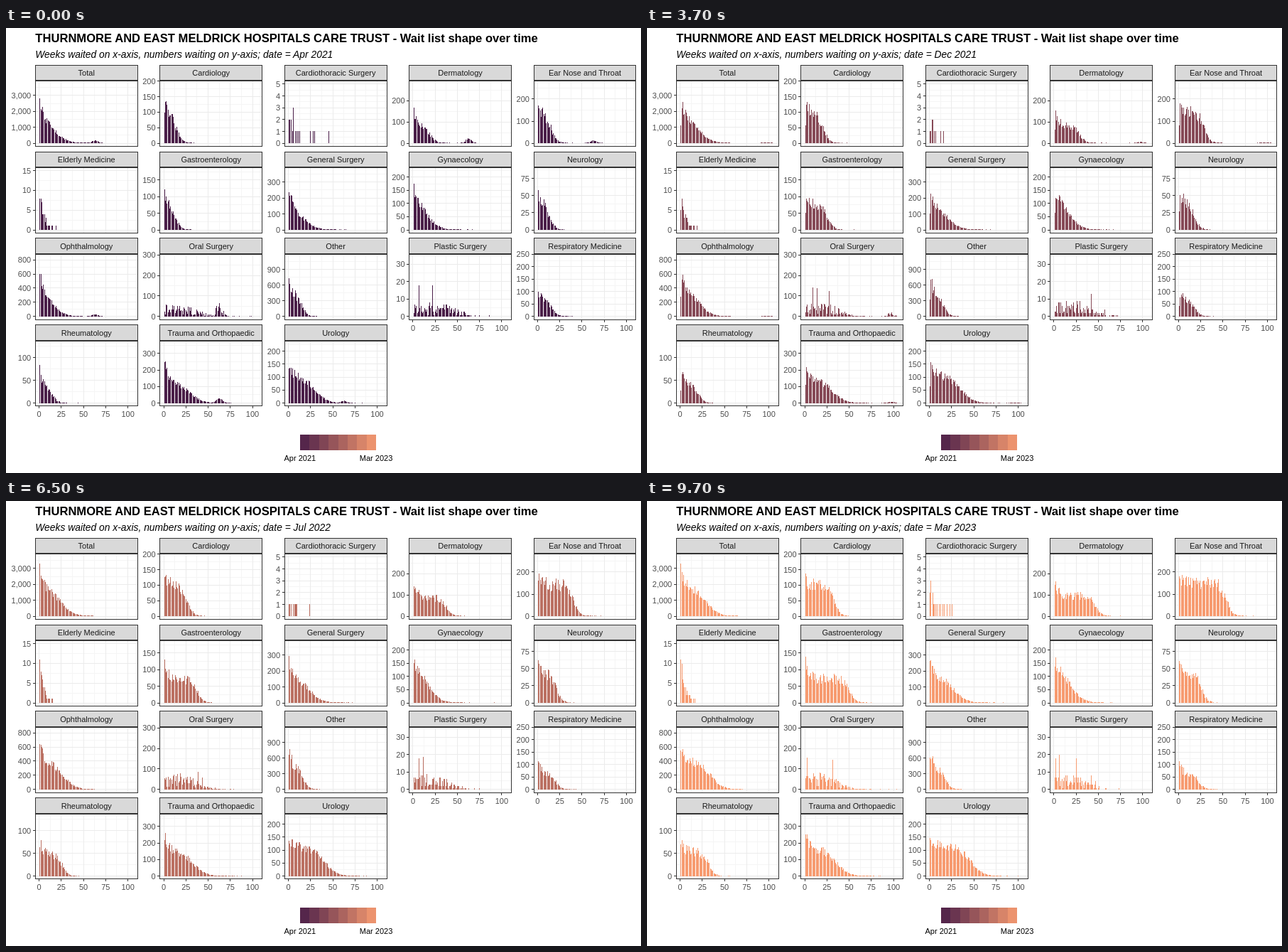
An HTML page that plays this animation: 894x626 px, repeating every 10000 ms.

```html
<!DOCTYPE html>
<html lang="en">
<head>
<meta charset="utf-8">
<title>Wait list shape over time</title>
<style>
html, body { margin: 0; width: 100%; height: 100%; overflow: hidden; background: #fff; }
svg { display: block; font: 11.04px "Liberation Sans", Arial, sans-serif; }
.title { font-size: 16.6px; font-weight: bold; }
.sub { font-size: 13.85px; font-style: italic; }
.axis { fill: #4d4d4d; }
.mid { text-anchor: middle; }
.end { text-anchor: end; }
.strip { fill: #1a1a1a; }
path, rect { shape-rendering: crispEdges; }
.grid { stroke: #ebebeb; }
.minor { stroke: #f5f5f5; }
.box { fill: none; stroke: #333; }
</style>
</head>
<body>
<svg id="stage" width="894" height="626" viewBox="0 0 894 626">
  <text class="title" x="41.3" y="20.2">THURNMORE AND EAST MELDRICK HOSPITALS CARE TRUST - Wait list shape over time</text>
  <text class="sub" x="41.3" y="42">Weeks waited on x-axis, numbers waiting on y-axis; date = <tspan id="date">Apr 2021</tspan></text>
  <g id="charts"></g>
  <g id="legend"></g>
</svg>
<script>
const LOOP = 10000, LAST = 23, WEEKS_PER_MONTH = 4.345;
const MONTHS = 'Jan Feb Mar Apr May Jun Jul Aug Sep Oct Nov Dec'.split(' ');
const KINDS = {
  gentle: { soft: 7, rough: .28 },
  steep: { soft: 3.5, rough: .36 },
  patchy: { soft: 7, rough: .85 }
};
const panels = [];
const $ = id => document.getElementById(id);
const mix = (a, b, k) => a + (b - a) * k;
const snap = v => Math.floor(v) + .5;
const hash = (a, b) => { const v = Math.sin(a * 12.9898 + b * 78.233) * 43758.5453; return v - Math.floor(v); };

// New patients start at top and fall to a shelf; the shelf's height and its edge
// (in weeks) drift from the first value to the second. backlog is an old bulge.
function panel(name, kind, step, max, top, shelf, shelfEnd, edge, edgeEnd, backlog = 0) {
  panels.push({ name, step, max, top, shelf, shelfEnd, edge, edgeEnd, backlog, id: panels.length, ...KINDS[kind] });
}

panel('Total', 'gentle', 1000, 3710, 3400, 1750, 2250, 18, 28, 190);
panel('Cardiology', 'steep', 50, 190.6, 155, 125, 120, 14, 33);
panel('Cardiothoracic Surgery', 'patchy', 1, 5, 3.5, .6, .6, 20, 25);
panel('Dermatology', 'steep', 100, 278, 190, 90, 115, 20, 47, 24);
panel('Ear Nose and Throat', 'steep', 100, 267, 220, 165, 180, 15, 54, 16);
panel('Elderly Medicine', 'steep', 5, 15, 12, 3, 2.5, 6, 9);
panel('Gastroenterology', 'steep', 50, 178, 140, 90, 88, 13, 51);
panel('General Surgery', 'gentle', 100, 371, 325, 155, 190, 18, 28);
panel('Gynaecology', 'gentle', 50, 224, 195, 145, 165, 15, 18);
panel('Neurology', 'steep', 25, 86.5, 62, 50, 56, 13, 25);
panel('Ophthalmology', 'gentle', 200, 836, 760, 470, 470, 14, 34, 36);
panel('Oral Surgery', 'patchy', 100, 288, 65, 58, 105, 42, 38, 85);
panel('Other', 'steep', 300, 1133, 880, 520, 510, 15, 18);
panel('Plastic Surgery', 'patchy', 10, 34, 9, 9, 10, 52, 40);
panel('Respiratory Medicine', 'steep', 50, 238, 125, 84, 76, 16, 23);
panel('Rheumatology', 'steep', 50, 130, 88, 42, 66, 15, 32);
panel('Trauma and Orthopaedic', 'gentle', 100, 358, 300, 150, 195, 30, 36, 32);
panel('Urology', 'gentle', 50, 228, 175, 122, 140, 30, 46, 10);

const shade = k => `rgb(${[[74, 247], [30, 155], [72, 112]].map(([a, b]) => Math.round(mix(a, b, k)))})`;
const label = (x, y, cls, text) => `<text class="${cls}" x="${x}" y="${y + 3.95}">${text}</text>`;

function frame(p) {
  const col = p.id % 5, row = Math.floor(p.id / 5);
  const left = 41.3 + col * 175.45, right = left + 143.9;
  const stripTop = 52.3 + row * 121.8, top = stripTop + 22.3, bottom = top + 91.8;
  const l = snap(left), r = snap(right), s = snap(stripTop), t = snap(top), b = snap(bottom);
  p.x0 = left + 5.3;
  p.base = bottom - 4.2;
  p.scale = 83.2 / p.max;
  let minor = '', major = '', ticks = '', text = '';
  for (let i = 0; i <= 8; i++) {
    const x = p.x0 + i * 15.625, d = `M${snap(x)} ${t}V${b}`;
    if (i % 2) { minor += d; continue; }
    major += d;
    if (row === (col < 3 ? 3 : 2)) {
      ticks += `M${snap(x)} ${b}v3.5`;
      text += label(x, bottom + 11.6, 'axis mid', i * 12.5);
    }
  }
  for (let i = 0; ; i++) {
    const v = i * p.step / 2, y = p.base - v * p.scale;
    if (y < top) break;
    const d = `M${l} ${snap(y)}H${r}`;
    if (i % 2) { minor += d; continue; }
    major += d;
    ticks += `M${l} ${snap(y)}h-3.5`;
    text += label(left - 6.1, y, 'axis end', v.toLocaleString('en-US'));
  }
  return `<path class="minor" d="${minor}"/><path class="grid" d="${major}"/>
    <path id="bars${p.id}"/>
    <path class="box" d="M${l} ${t}H${r}V${b}H${l}Z${ticks}"/>
    <rect x="${l}" y="${s}" width="${r - l}" height="${t - s - 1}" fill="#d9d9d9" stroke="#333"/>
    ${label((left + right) / 2, stripTop + 11.1, 'strip mid', p.name)}${text}`;
}

function height(p, week, month) {
  const k = month / LAST;
  const shelf = mix(p.shelf, p.shelfEnd, k), edge = mix(p.edge, p.edgeEnd, k);
  const fresh = (p.top - shelf) * Math.exp((1 - week) / 4);
  const old = p.backlog * Math.exp(-month / 7 - ((week - 63 - month * WEEKS_PER_MONTH) / 5) ** 2);
  const holiday = week === 1 && month % 12 === 8 ? .45 : 1;
  return (fresh + shelf / (1 + Math.exp((week - edge) / p.soft)) + old) * holiday;
}

// Random dips belong to a referral week, so they age to the right with the list.
function count(p, week, month) {
  const cohort = week - Math.round(month * WEEKS_PER_MONTH) + 200;
  const luck = hash(cohort, p.id + 1);
  const surge = p.rough > .5 && luck < .04 ? 2 : 1;
  const v = height(p, week, month) * (1 - p.rough * luck) * surge;
  return Math.min(p.max, Math.floor(v + hash(cohort, p.id + 40)));
}

function bars(p, month) {
  const base = Math.round(p.base);
  let d = '';
  for (let w = 1; w <= 104; w++) {
    const h = count(p, w, month) * p.scale;
    if (h >= .2) d += `M${Math.round(p.x0 + w * 1.25 - .56)} ${base}v${-Math.max(1, Math.round(h))}h1V${base}z`;
  }
  return d;
}

$('charts').innerHTML = panels.map(frame).join('');
$('legend').innerHTML = Array.from({ length: 8 }, (_, i) =>
  `<rect x="${414 + Math.round(i * 13.4)}" y="572" width="${i < 7 ? 14 : 13}" height="22" fill="${shade((i + .5) / 8)}"/>`
).join('') + label(413.8, 605, 'mid', 'Apr 2021') + label(521, 605, 'mid', 'Mar 2023');

const startOf = i => i <= 4 ? i * 500 : 2000 + (i - 4) * 400;
let shown = -1;

function draw() {
  const t = performance.now() % LOOP;
  let i = LAST;
  while (startOf(i) > t) i--;
  const halfway = i > 0 && t < startOf(i) + 100;
  const month = halfway ? i - .5 : i;
  if (month !== shown) {
    shown = month;
    const m = Math.floor(month) + 3;
    $('date').textContent = `${MONTHS[m % 12]} ${2021 + Math.floor(m / 12)}`;
    for (const p of panels) {
      const el = $('bars' + p.id);
      el.setAttribute('d', bars(p, month));
      el.setAttribute('fill', shade(month / LAST));
    }
  }
  requestAnimationFrame(draw);
}
draw();
</script>
</body>
</html>
```
